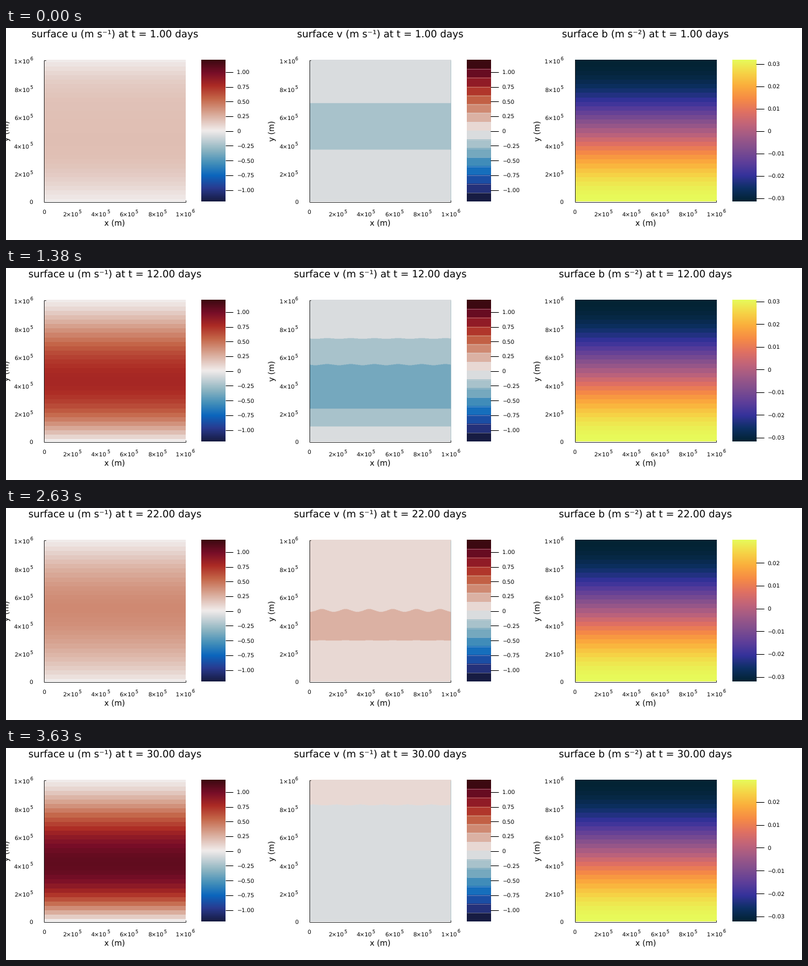
A matplotlib script for the animation above (3760 ms loop, 1280 by 341 pixels).

```python
import numpy as np
import matplotlib.pyplot as plt
from matplotlib.animation import FuncAnimation
from matplotlib.colors import LinearSegmentedColormap, to_rgb

W, H, DPI = 1280, 341, 100
LOOP, STEP, DAYS = 3760, 20, 30
TOP, SIDE = 52, 227.5
BOTTOM = TOP + SIDE
LEFTS = [61 + 426.75 * i for i in range(3)]
BAR, BAR_END = 253, 291.5
TITLE_PX, GUIDE_PX, TICK_PX, POWER_PX = 15.95, 12.5, 9.1, 7.6
INK = "#222222"

plt.rcParams.update({"font.family": "DejaVu Sans", "text.hinting": "none"})


def colormap(name, colors, stops=None):
    stops = np.linspace(0, 1, len(colors)) if stops is None else stops
    return LinearSegmentedColormap.from_list(name, list(zip(stops, map(to_rgb, colors))), N=512)


blues = "#171c42 #293a8f #0b66bd #4590b9 #8eb5c2 #d2d8db".split()
reds = "#e6d2cc #d59d89 #c46548 #ac2b24 #780e28 #3c0911".split()
even = np.linspace(0, 1, 12)
balance = colormap("balance", blues + ["#f1eceb"] + reds, np.r_[even[:6], 0.5, even[6:]])
thermal = colormap("thermal", (
    "#032333 #0d3064 #35329b #5d3e99 #7e4d8f #9e5987 "
    "#c16479 #e17161 #f68b45 #fbad3c #f6d346 #e7fa5a").split())
band_colors = balance(np.linspace(0, 1, 16))[:, :3]

rows = (np.arange(454) + 0.5)[::-1, None] / 454
cols = (np.arange(228) + 0.5)[None, :] / 228
cell_rows = np.floor(rows * 32 + 0.5) / 32


def hump(y, skew, power):
    return np.sin(np.pi * y ** skew) ** power


def flow(y, day):
    """Inertial oscillation around a jet that settles after spin-up."""
    t = day - 1
    spin_up = np.exp(-t / 3)
    sway = np.sin(2 * np.pi * t / 22)
    phase = 2.735 * t - 0.465 - sway * (0.13 + 0.5 * (y - 0.4))
    jet = (0.71 - 0.14 * spin_up) * hump(y, 0.83 + 0.25 * spin_up, 1.2)
    swing = (0.37 + 0.06 * spin_up) * hump(y, 0.7 + 0.4 * spin_up, 1.7)
    return jet - swing * np.cos(phase), swing * np.sin(phase)


def rippled(x, y, day):
    size = 0.02 * (day / 25) ** 2 * np.exp(-((y - 0.6) / 0.15) ** 2)
    crest = 0.062 + 0.013 * (day - 20)
    return np.clip(y - size * np.cos(12 * np.pi * (x - crest)), 0, 1)


fig = plt.figure(figsize=(W / DPI, H / DPI), dpi=DPI, facecolor="white")
ax = fig.add_axes([0, 0, 1, 1])


def text(x, y, s, px, **kw):
    kw = {"ha": "center", "va": "baseline", "color": "black", **kw}
    return ax.text(x, y, s, fontsize=px * 72 / DPI, **kw)


def line(xs, ys, px=0.9, color=INK, **kw):
    return ax.plot(xs, ys, color=color, lw=px * 72 / DPI, solid_capstyle="butt", **kw)[0]


def picture(data, x0, x1, **kw):
    return ax.imshow(data, extent=(x0, x1, BOTTOM, TOP), aspect="auto", **kw)


def power_label(right, y, k):
    base, exponent = ("1", "6") if k == 5 else (str(2 * k), "5")
    text(right - 5, y, base + "\u00d710", TICK_PX, ha="right")
    text(right - 5, y - 4.5, exponent, POWER_PX, ha="left")


def number(v):
    return "0" if abs(v) < 1e-9 else f"{v:.2f}".replace("-", "\u2212")


def bar_y(value, low, high):
    return BOTTOM - SIDE * (value - low) / (high - low)


def bar_tick(left, y, value):
    mark = line([left + BAR_END, left + 304], [y, y], 1, "black")
    return mark, text(left + 310, y + 3.3, number(value), TICK_PX, ha="left")


def draw_axes(left):
    line([left, left], [TOP, BOTTOM])
    line([left, left + SIDE], [BOTTOM, BOTTOM])
    line([left, left + 2.5], [TOP + 0.4, TOP + 0.4])
    line([left + SIDE, left + SIDE], [BOTTOM - 2.5, BOTTOM])
    text(left, 298.5, "0", TICK_PX)
    text(left - 18, BOTTOM + 3.5, "0", TICK_PX, ha="right")
    for k in range(1, 6):
        power_label(left + SIDE * k / 5 + 15, 302.5, k)
        power_label(left - 18, BOTTOM - SIDE * k / 5 + 5, k)
    text(left + SIDE / 2, 318, "x (m)", GUIDE_PX)
    text(left - 59, TOP + SIDE / 2, "y (m)", GUIDE_PX, rotation=90, va="center")


u_img = picture(np.zeros((454, 1)), LEFTS[0], LEFTS[0] + SIDE,
                cmap=balance, vmin=-1.2, vmax=1.2, interpolation="nearest")
v_img = picture(np.ones((454, 228, 3)), LEFTS[1], LEFTS[1] + SIDE, interpolation="antialiased")
buoyancy = (1 + np.cos(np.pi * cell_rows ** 0.97)) / 2
picture(buoyancy, LEFTS[2], LEFTS[2] + SIDE, cmap=thermal, vmin=0, vmax=1, interpolation="nearest")

ramp = np.linspace(1, 0, 256)[:, None]
picture(ramp, LEFTS[0] + BAR, LEFTS[0] + BAR_END, cmap=balance)
picture(band_colors[::-1, None], LEFTS[1] + BAR, LEFTS[1] + BAR_END, interpolation="nearest")
picture(ramp, LEFTS[2] + BAR, LEFTS[2] + BAR_END, cmap=thermal)
for k in range(1, 16):
    y = TOP + SIDE * k / 16
    line([LEFTS[1] + BAR, LEFTS[1] + BAR_END], [y, y], 0.7, "#dddddd", alpha=0.5)
line([LEFTS[1] + SIDE] * 2, [TOP, BOTTOM], 0.7, "#a9c2ca")

for left in LEFTS:
    draw_axes(left)
for left in LEFTS[:2]:
    for value in np.arange(-4, 5) / 4:
        bar_tick(left, bar_y(value, -1.2, 1.2), value)
b_ticks = [(value, *bar_tick(LEFTS[2], TOP, value)) for value in np.arange(-3, 4) / 100]

names = ["u (m s\u207b\u00b9)", "v (m s\u207b\u00b9)", "b (m s\u207b\u00b2)"]
titles = [text(left + SIDE / 2, 15, "", TITLE_PX) for left in LEFTS]

ax.set_xlim(0, W)
ax.set_ylim(H, 0)
ax.axis("off")


def update(i):
    day = 1 + min(int((i * STEP + 15) * DAYS / LOOP), DAYS - 1)
    u_img.set_data(flow(cell_rows, day)[0])
    v = flow(rippled(cols, rows, day), day)[1]
    v_img.set_data(band_colors[np.clip(np.floor((v + 1.2) / 0.15).astype(int), 0, 15)])

    high = 0.0316 - 0.0035 * (1 - np.exp((1 - day) / 30))
    low = -0.0316 - 0.000024 * (day - 1)
    for value, mark, label in b_ticks:
        y = bar_y(value, low, high)
        mark.set_ydata([y, y])
        label.set_y(y + 3.3)
        for part in (mark, label):
            part.set_visible(value <= high)
    for title, name in zip(titles, names):
        title.set_text(f"surface {name} at t = {day:.2f} days")
    return [u_img, v_img, *titles]


anim = FuncAnimation(fig, update, frames=LOOP // STEP, interval=STEP, repeat=True, repeat_delay=0)
plt.show()
```
